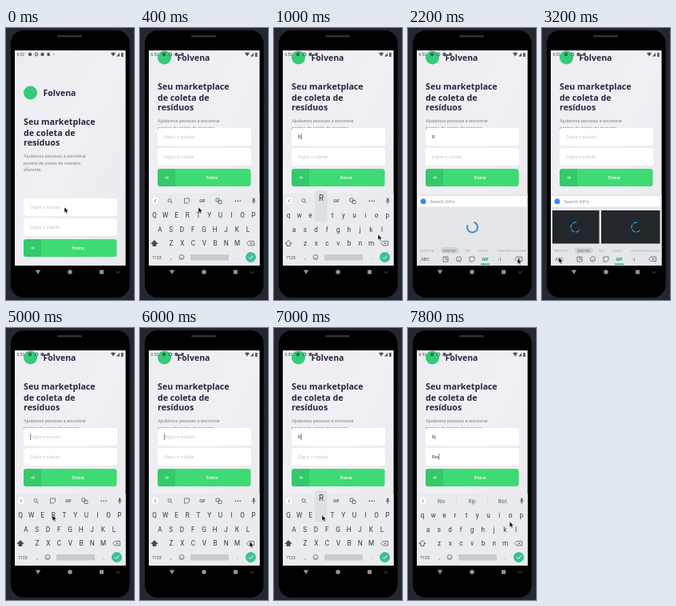
Animation, 160 px wide and 340 px high, one loop 8 s. Source, as an HTML page:

```html
<!DOCTYPE html>
<html lang="pt">
<head>
<meta charset="utf-8">
<title>Phone form demo</title>
<style>
  html, body { margin: 0; width: 100%; height: 100%; overflow: hidden; background: #262633; }
  svg { display: block; width: 100%; height: 100%; font-family: Roboto, "Noto Sans", sans-serif; }
  .bold { font-family: "Noto Sans", "Open Sans", sans-serif; font-weight: 700; fill: #2b2540; }
  .line { fill: none; stroke: #59646b; stroke-width: .8; }
</style>
</head>
<body>
<svg id="stage" viewBox="0 0 160 340">
  <defs>
    <clipPath id="screen"><rect x="11" y="28" width="138.500" height="269"/></clipPath>
    <linearGradient id="page" x2="1" y2="1">
      <stop offset="0" stop-color="#ededf2"/><stop offset=".5" stop-color="#f0eff4"/><stop offset="1" stop-color="#e8e8ed"/>
    </linearGradient>
  </defs>
  <rect width="160" height="340" fill="#262633"/>
  <rect x="154" y="78" width="2.500" height="17" rx="1" fill="#25262b"/>
  <rect x="154" y="110" width="2.500" height="32" rx="1" fill="#25262b"/>
  <rect x="5.500" y="2.500" width="149.500" height="335" rx="17" fill="#000" stroke="#242529"/>
  <rect x="64" y="9" width="31" height="2.600" rx="1.300" fill="#303134"/>

  <g clip-path="url(#screen)">
    <rect x="11" y="28" width="139" height="269" fill="url(#page)"/>
    <g id="main">
      <circle cx="30.500" cy="81" r="8.500" fill="#34cb79"/>
      <text class="bold" x="46.500" y="84.500" font-size="10.500">Folvena</text>
      <g class="bold" font-size="10.700">
        <text x="22" y="121">Seu marketplace</text>
        <text x="22" y="134.500">de coleta de</text>
        <text x="22" y="147">resíduos</text>
      </g>
      <g font-size="5.650" fill="#808090">
        <text x="22" y="161.500">Ajudamos pessoas a encontrar</text>
        <text x="22" y="170.500">pontos de coleta de maneira</text>
        <text x="22" y="179">eficiente.</text>
      </g>
    </g>
    <g id="form">
      <rect x="22" y="213" width="117" height="22" rx="3.500" fill="#fff"/>
      <rect x="22" y="238" width="117" height="22" rx="3.500" fill="#fff"/>
      <text id="state" x="30" y="226" font-size="5.700"/>
      <text id="city" x="30" y="251" font-size="5.700"/>
      <rect id="caret" width=".9" height="8" fill="#66736f"/>
      <rect x="22" y="264" width="116.500" height="22" rx="3.500" fill="#3edb74"/>
      <path d="M44 264H25.500a3.500 3.500 0 0 0-3.500 3.500v15a3.500 3.500 0 0 0 3.500 3.500H44z" fill="#36c96c"/>
      <path d="M31 275h4.500m-2-2 2 2-2 2" fill="none" stroke="#e4f8eb" stroke-width=".8"/>
      <text x="90.500" y="277" font-size="5.600" font-weight="500" fill="#f0fbf4" text-anchor="middle">Entrar</text>
    </g>
    <g fill="#55565e">
      <text id="clock" x="13.500" y="35" font-size="5"/>
      <circle cx="30" cy="33" r="2.200"/>
      <circle cx="38" cy="33" r="1.900" fill="none" stroke="#55565e"/>
      <circle cx="45.500" cy="33" r="2.200"/>
      <rect x="51.500" y="31" width="3.200" height="4"/>
      <circle cx="60" cy="33" r=".7"/>
      <path d="M131 31.500q3-2 6 0l-3 4zM142 35.500v-4.500l-4 4.500zM144 31h2.600v5H144z"/>
    </g>

    <g id="keyboard">
      <rect x="11" y="207" width="139" height="90" fill="#e9ebee"/>
      <g id="tools">
        <circle cx="19" cy="216" r="4.200" fill="#fff"/>
        <path class="line" d="M20 214l-2 2 2 2"/>
        <circle class="line" cx="37" cy="215.500" r="2"/><path class="line" d="M38.500 217l2 2"/>
        <path class="line" d="M55.500 213h6v4l-2 2h-4z"/>
        <text x="78" y="218" font-size="5" font-weight="700" fill="#59646b" text-anchor="middle">GIF</text>
        <path class="line" d="M95 213h4v4h-4zM98 215.500h4v4h-4z"/>
        <path d="M118.500 215.500h1.500v1.500h-1.500zM121.500 215.500h1.500v1.500h-1.500zM124.500 215.500h1.500v1.500h-1.500z" fill="#59646b"/>
      </g>
      <g id="hints" font-size="6.400" fill="#59646b" text-anchor="middle">
        <circle cx="18.500" cy="216" r="4.200" fill="#fff"/>
        <path class="line" d="M17.500 214l2 2-2 2"/>
        <text x="41.500" y="218.500">Rio</text><text x="80" y="218.500">Rip</text><text x="118" y="218.500">Riot</text>
        <path d="M60.500 213v6M99.500 213v6" stroke="#ccd1d4" stroke-width=".6"/>
      </g>
      <rect x="141" y="212.500" width="2.400" height="4.500" rx="1.200" fill="#59646b"/>
      <path class="line" d="M139.800 216q2.400 4 4.800 0M142.200 218v2"/>
      <g id="keys" font-size="8.200" fill="#353d42" text-anchor="middle"/>
      <path id="shift" d="M18 265.500l4 4h-2v3h-4v-3h-2z" stroke="#424b50" stroke-width=".8"/>
      <path class="line" d="M136 266.500h6.500v5.500H136l-2.500-2.750zM137.500 268l3 2.500m0-2.500l-3 2.500"/>
      <text x="21" y="289" font-size="5.400" fill="#424b50" text-anchor="middle">?123</text>
      <text x="39" y="289" font-size="7" fill="#424b50" text-anchor="middle">,</text>
      <circle class="line" cx="52" cy="286.500" r="3"/><path class="line" d="M50.500 287.300q1.500 1.500 3 0"/>
      <rect x="63" y="283" width="48" height="7.500" rx="1" fill="#c8cccf"/>
      <text x="122" y="289" font-size="7" fill="#424b50" text-anchor="middle">.</text>
      <circle cx="138.500" cy="286.500" r="6.500" fill="#3bbf9c"/>
      <path d="M135.800 286.500l2 2 3.500-4" fill="none" stroke="#fff"/>
      <g id="popup">
        <rect x="51.500" y="203" width="15" height="39" rx="2.500" fill="#dce0e3"/>
        <text x="59" y="215.500" font-size="10" fill="#353d42" text-anchor="middle">R</text>
      </g>
    </g>

    <g id="gifs">
      <rect x="11" y="208" width="139" height="89" fill="#e5e6ea"/>
      <rect x="12" y="210" width="136" height="13.500" rx="1" fill="#fff"/>
      <circle cx="19" cy="216.700" r="3.500" fill="#4285f4"/>
      <text x="27.500" y="219" font-size="5.800" fill="#8b9499">Search GIFs</text>
      <circle id="loader" cx="80.500" cy="249" r="6.500" fill="none" stroke="#4a8cc8" stroke-width="2" stroke-dasharray="31 10"/>
      <g id="thumbs">
        <rect x="13" y="228" width="58.500" height="41.500" fill="#23272c"/>
        <rect x="74" y="228" width="73.500" height="41.500" fill="#23272c"/>
        <g fill="none" stroke="#2d93cc" stroke-width="1.400" stroke-dasharray="5 1.500 5 1.500 5 1.500 5 14">
          <circle class="ring" cx="42" cy="249" r="6"/><circle class="ring" cx="118" cy="249" r="6"/>
        </g>
      </g>
      <rect x="41" y="274" width="23" height="8" rx="4" fill="#d0d3d7"/>
      <g font-size="4" fill="#a2a8ac">
        <text x="15" y="279.500">RECENTS</text><text x="44" y="279.500" fill="#59646b">EXCITED</text>
        <text x="71" y="279.500">YAY</text><text x="88" y="279.500">CRAZY</text><text x="111" y="279.500">CONGRATULATIONS</text>
      </g>
      <g font-size="5.400" fill="#424b50" text-anchor="middle">
        <text x="21.500" y="291">ABC</text>
        <text x="96.500" y="291" font-weight="700" fill="#168a72">GIF</text>
        <text x="114" y="291">:-)</text>
      </g>
      <rect x="91" y="294.500" width="11" height="1.500" fill="#27b08c"/>
      <path class="line" d="M44 286h6v6h-6zM47 286v3h3M77 286h6v4l-2 2h-4zM136 286h6.500v5.500H136l-2.500-2.750zM137.500 287.500l3 2.500m0-2.500l-3 2.500"/>
      <circle class="line" cx="63.500" cy="289" r="3.200"/><path class="line" d="M62 289.500q1.500 2 3 0"/>
    </g>
  </g>

  <g fill="#929399">
    <path d="M36.800 302.500h6.400L40 308z"/><circle cx="80" cy="305" r="2.800"/><rect x="117" y="302.500" width="5" height="5"/>
    <path d="M137.500 304l2.500 2.500 2.500-2.500" fill="none" stroke="#5c5d63"/>
  </g>
  <path id="mouse" d="M0 0v8.200l1.900-1.700 1.300 3 1.500-.7-1.300-2.800h2.600z" fill="#111" stroke="#fff" stroke-width=".5"/>
</svg>
<script>
const LOOP = 8000, STEP = 200;
const $ = id => document.getElementById(id);
const show = (id, on) => $(id).style.display = on ? "" : "none";

// Letter keys: row, first key centre, baseline
const keys = [["qwertyuiop", 18, 237], ["asdfghjkl", 25, 255], ["zxcvbnm", 39, 272]]
  .flatMap(([row, x, y]) => [...row].map((letter, i) => {
    const el = document.createElementNS("http://www.w3.org/2000/svg", "text");
    el.setAttribute("x", x + i * 13.75);
    el.setAttribute("y", y);
    $("keys").append(el);
    return { el, letter };
  }));

// Pointer tip: time, x, y
const path = [
  [0, 73, 224], [400, 73, 224], [800, 58, 234], [1000, 130, 258], [1200, 136, 266],
  [1400, 115, 242], [1700, 78, 217], [1800, 78, 217], [2200, 137, 288], [2600, 137, 288],
  [3200, 21, 287], [3800, 21, 287], [4400, 45, 255], [4800, 58, 234], [5200, 58, 234],
  [5800, 137, 267], [6200, 137, 267], [6800, 60, 234], [7000, 60, 234], [7200, 105, 250],
  [7400, 105, 250], [7600, 92, 166], [7800, 127, 242]
];

function pointer(t) {
  const i = path.findIndex(p => p[0] > t);
  if (i < 0) return path[path.length - 1].slice(1);
  const [t0, x0, y0] = path[i - 1], [t1, x1, y1] = path[i];
  const k = (t - t0) / (t1 - t0);
  return [x0 + (x1 - x0) * k, y0 + (y1 - y0) * k];
}

const within = (t, ...spans) => spans.some(([a, b]) => t >= a && t < b);

function field(id, value, hint) {
  $(id).textContent = value || hint;
  $(id).setAttribute("fill", value ? "#33333c" : "#c8c8ce");
}

function render(t) {
  const open = t >= 400;
  const gifs = within(t, [1800, 3400]);
  const state = t >= 7400 ? "Rj" : within(t, [800, 2600], [5200, 6000], [7000, LOOP]) ? "R" : "";
  const city = t >= 7800 ? "Rio" : "";
  const upper = within(t, [400, 1000], [3400, 5400], [6000, 7200], [7600, 7800]);
  const onCity = t >= 7600;

  $("main").setAttribute("transform", `translate(0 ${open ? -44 : 0})`);
  $("form").setAttribute("transform", `translate(0 ${open ? -88 : 0})`);
  show("keyboard", open && !gifs);
  show("gifs", gifs);
  show("popup", within(t, [800, 1200], [5200, 5400], [7000, 7200]));
  show("tools", !city);
  show("hints", city);
  show("loader", t < 2600);
  show("thumbs", t >= 2600);

  field("state", state, "Digite o estado");
  field("city", city, "Digite a cidade");
  const [id, value] = onCity ? ["city", city] : ["state", state];
  $("caret").setAttribute("x", 30.2 + (value ? $(id).getComputedTextLength() : 0));
  $("caret").setAttribute("y", onCity ? 245 : 220);
  show("caret", t >= 200 && (onCity || (t + 800) % 1000 >= 400 || t % 1000 === 0));

  for (const { el, letter } of keys) el.textContent = upper ? letter.toUpperCase() : letter;
  $("shift").setAttribute("fill", upper ? "#424b50" : "none");
  $("clock").textContent = t < 3000 ? "6:52" : "6:53";

  $("loader").setAttribute("transform", `rotate(${t * .36 - 146} 80.5 249)`);
  document.querySelectorAll(".ring").forEach(r =>
    r.setAttribute("transform", `rotate(${t * .2 + 120} ${r.getAttribute("cx")} 249)`));
  $("mouse").setAttribute("transform", `translate(${pointer(t)}) scale(.85)`);
}

const start = performance.now();
function tick() {
  const t = (performance.now() - start) % LOOP;
  render(Math.floor(t / STEP) * STEP);
  requestAnimationFrame(tick);
}
tick();
</script>
</body>
</html>
```
